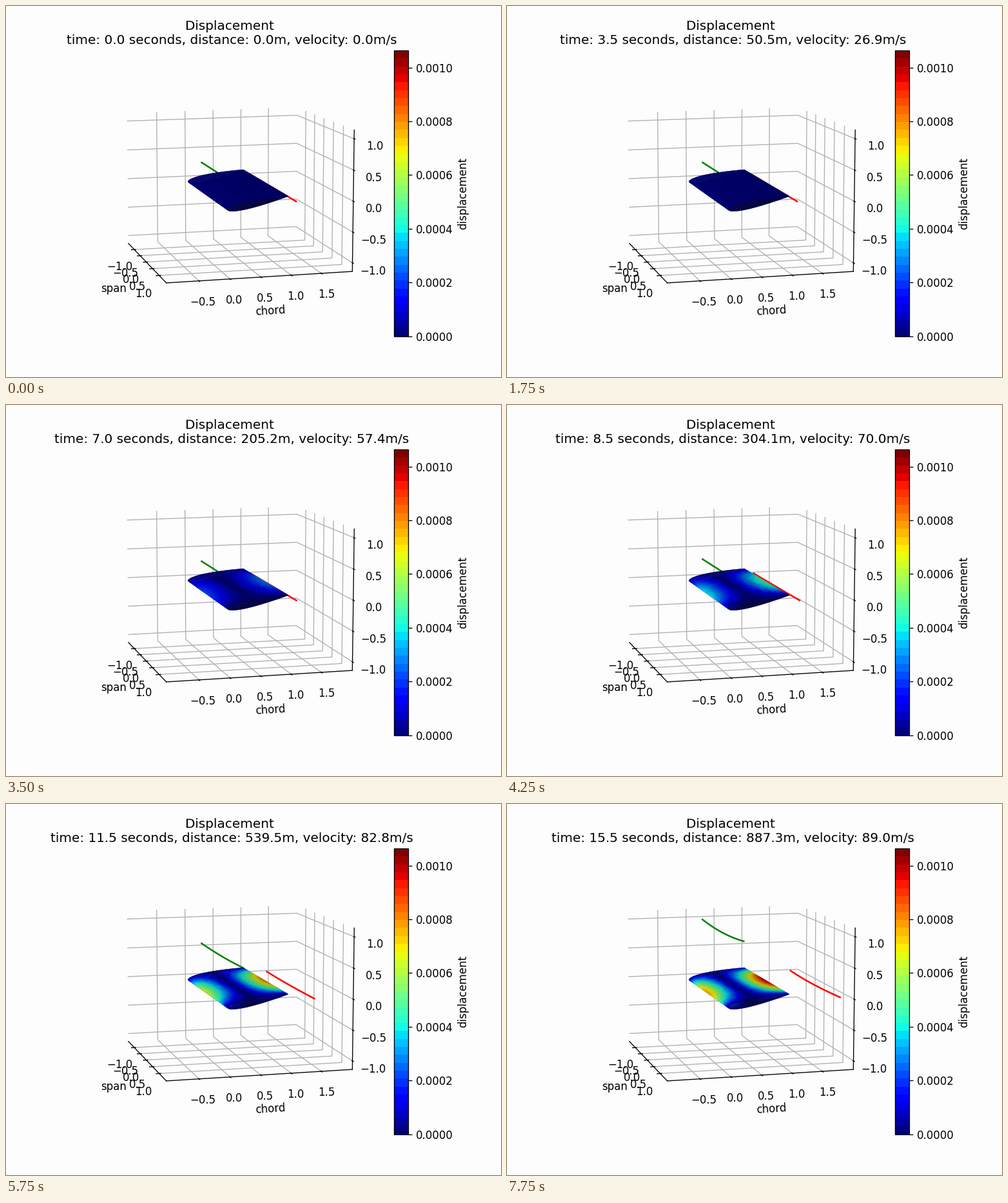
A matplotlib script that plays this animation: 768 by 576 pixels, repeating every 8 s.

```python
import numpy as np
import matplotlib.pyplot as plt
from matplotlib.animation import FuncAnimation
from matplotlib.cm import ScalarMappable
from matplotlib.colors import Normalize
from mpl_toolkits.mplot3d.art3d import Poly3DCollection

W, H, DPI = 768, 576, 120
STEP = 0.5                      # simulated seconds per frame
CENTRE = 350.5                  # horizontal centre of the 3D axes, in pixels
HALF_SPAN = 1.35
PITCH = np.radians(9.7)
LEADING = np.array([0.008, -0.07])
THICKNESS = 0.115
TOP_SPEED = 89.0
U_MAX = 0.0010636

velocity = np.array([
    0, 2.8, 6.0, 9.8, 14.4, 18.5, 22.7, 26.9, 31.3, 35.5, 39.7,
    44.1, 48.5, 52.8, 57.4, 61.7, 66.0, 70.0, 73.7, 75.6,
    77.8, 79.6, 81.4, 82.8, 84.1, 85.3, 86.2, 86.8,
    87.5, 88.1, 88.6, 89.0])
distance = np.cumsum(velocity) * STEP


def airfoil(c, side):
    """Pitched profile point (chord, height) for chord fraction c."""
    y = side * 5 * THICKNESS * (0.2969 * np.sqrt(c) - 0.126 * c - 0.3516 * c**2
                                + 0.2843 * c**3 - 0.1036 * c**4)
    cos, sin = np.cos(PITCH), np.sin(PITCH)
    return LEADING + np.array([c * cos - y * sin, c * sin + y * cos])


def build_wing(n_chord=32, n_span=30):
    """Quads of the open-ended skin with chord and span fraction of each centre."""
    chord = (1 - np.cos(np.linspace(0, np.pi, n_chord + 1))) / 2
    span = np.linspace(-1, 1, n_span + 1)
    quads, c_mid, s_mid = [], [], []
    for c0, c1 in zip(chord, chord[1:]):
        for side in (1, -1):
            a, b = airfoil(c0, side), airfoil(c1, side)
            for s0, s1 in zip(span, span[1:]):
                x0, x1 = s0 * HALF_SPAN, s1 * HALF_SPAN
                quad = [(x0, *a), (x1, *a), (x1, *b), (x0, *b)]
                quads.append(quad[::side])
                c_mid.append((c0 + c1) / 2)
                s_mid.append((s0 + s1) / 2)
    return np.array(quads), np.array(c_mid), np.array(s_mid)


def shade_factors(quads):
    normal = np.cross(quads[:, 2] - quads[:, 0], quads[:, 3] - quads[:, 1])
    normal /= np.linalg.norm(normal, axis=1)[:, None]
    light = np.array([-2, -2, 1]) / 3
    return 0.65 + 0.35 * normal @ light


quads, c_mid, s_mid = build_wing()
shade = shade_factors(quads)
mode = np.abs(c_mid - 0.43) / 0.57 * (1 - 0.95 * s_mid**2)
jet = plt.get_cmap("jet", 36)


def wing_colors(v):
    rgba = jet(0.95 * (v / TOP_SPEED)**2.9 * mode)
    rgba[:, :3] *= shade[:, None]
    return rgba


fig = plt.figure(figsize=(W / DPI, H / DPI), dpi=DPI, facecolor="#fdfdfd")
side_len = 0.77 * H
ax = fig.add_axes([(CENTRE - side_len / 2) / W, 0.11, side_len / W, 0.77],
                  projection="3d", computed_zorder=False)
ax.set_facecolor("none")
ax.view_init(elev=10, azim=-15)
ax.set_xticks(np.arange(-1, 1.1, 0.5))
ax.set_yticks(np.arange(-0.5, 1.6, 0.5))
ax.set_zticks(np.arange(-1, 1.1, 0.5))
ax.set_xlabel("span")
ax.set_ylabel("chord")
for axis in (ax.xaxis, ax.yaxis, ax.zaxis):
    axis.set_pane_color((1, 1, 1, 0))
ax.yaxis.pane.set_edgecolor("#ebebeb")

wing = Poly3DCollection(quads, facecolors=wing_colors(0), edgecolors=wing_colors(0),
                        linewidths=0.3, zorder=3)
ax.add_collection3d(wing)
s_line = np.linspace(-1, 1, 41)
x_line = s_line * HALF_SPAN
flat = np.zeros_like(s_line)
lift_line, = ax.plot(x_line, flat, flat, color="green", zorder=2)
drag_line, = ax.plot(x_line, flat, flat, color="red", zorder=2)
ax.set_xlim(-1.52, 1.52)
ax.set_ylim(-1.02, 2.02)
ax.set_zlim(-1.14, 1.14)

cax = fig.add_axes([601.9 / W, 0.11, side_len / 20 / W, 0.77])
fig.colorbar(ScalarMappable(Normalize(0, U_MAX), jet), cax=cax, label="displacement")

title = fig.text(CENTRE / W, 1 - 59.1 / H, "", ha="center", va="baseline", fontsize=12)


def update(i):
    v = velocity[i]
    title.set_text(f"Displacement \ntime: {i * STEP:.1f} seconds, "
                   f"distance: {distance[i]:.1f}m, velocity: {v:.1f}m/s")
    colors = wing_colors(v)
    wing.set_facecolor(colors)
    wing.set_edgecolor(colors)
    load = 0.715 * (v / TOP_SPEED)**12 * (1 - 0.06 * (1 - s_line**2))
    lift_line.set_data_3d(x_line, flat + 0.25, 0.256 + load)
    drag_line.set_data_3d(x_line, 1.125 + load, flat + 0.01)
    return title, wing, lift_line, drag_line


anim = FuncAnimation(fig, update, frames=len(velocity), interval=250,
                     repeat=True, repeat_delay=0, blit=False)
plt.show()
```
